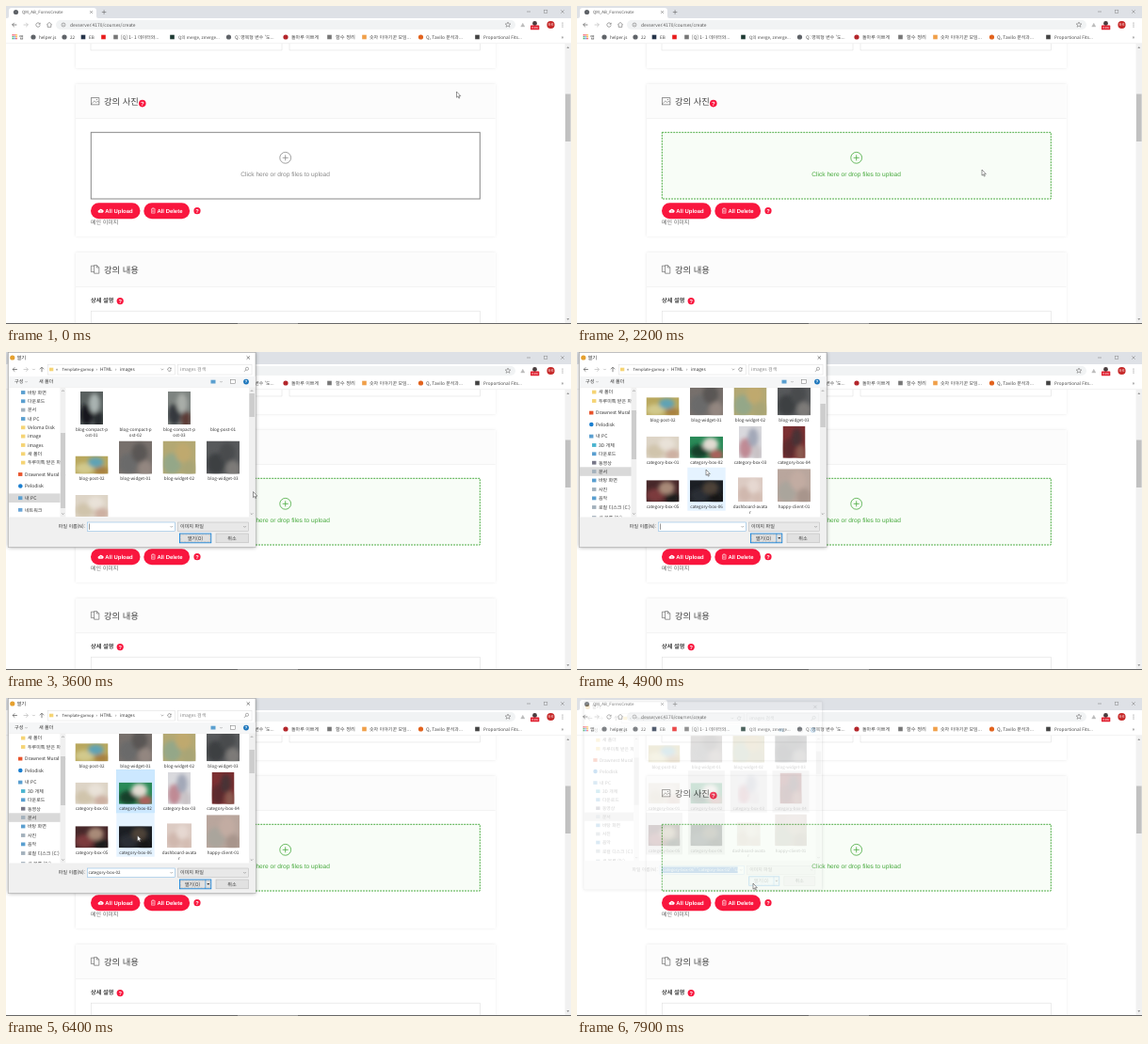
These frames come from a looping animation (600 by 338 pixels, 8 s). An HTML page:

```html
<!DOCTYPE html>
<html lang="ko">
<head>
<meta charset="utf-8">
<style>
html, body { margin: 0; width: 100%; height: 100%; overflow: hidden; background: #fff; }
svg { display: block; }
#stage { width: 600px; height: 338px; }
text { font-family: 'Noto Sans CJK KR', 'Noto Sans', sans-serif; text-rendering: geometricPrecision; white-space: pre; }
.web { font-family: 'Liberation Sans', Arial, sans-serif; }
.b { font-weight: 700; }
</style>
</head>
<body>
<svg id="stage" viewBox="0 0 600 338" xmlns="http://www.w3.org/2000/svg"></svg>
<script>
const LOOP = 8000, STEP = 100;
const RED = '#f9163e', GREEN = '#46a93c';

// Drawing helpers; text is centred vertically on y.
const rect = (x, y, w, h, fill, more = '') => `<rect x="${x}" y="${y}" width="${w}" height="${h}" fill="${fill}" ${more}/>`;
const box = (x, y, w, h, fill, line, sw = .6, more = '') => rect(x, y, w, h, fill, `stroke="${line}" stroke-width="${sw}" ${more}`);
const dot = (x, y, r, fill) => `<circle cx="${x}" cy="${y}" r="${r}" fill="${fill}"/>`;
const path = (d, line = '#666', sw = .6, fill = 'none') => `<path d="${d}" stroke="${line}" stroke-width="${sw}" fill="${fill}"/>`;
const text = (x, y, s, size = 5, fill = '#333', more = '') =>
  `<text x="${x}" y="${y + size * .36}" font-size="${size}" fill="${fill}" ${more}>${s}</text>`;
const mid = 'text-anchor="middle"';
const group = (id, s, more = '') => `<g id="${id}" ${more}>${s}</g>`;
const down = (x, y, s = 1.6, c = '#666') => path(`M${x - s} ${y - s / 2}l${s} ${s}l${s} ${-s}`, c, .5);
const cross = (x, y, s, c) => path(`M${x - s} ${y - s}l${2 * s} ${2 * s}m0 ${-2 * s}l${-2 * s} ${2 * s}`, c, .6);
const arrow = (x, y, dir, c) => path(`M${x - 2.4 * dir} ${y}h${4.8 * dir}m${-2.2 * dir} -2.2l${2.2 * dir} 2.2l${-2.2 * dir} 2.2`, c, .7);
const reload = (x, y, r = 2.2) => path(`M${x + r * .8} ${y - r * .6}a${r} ${r} 0 1 0 ${r * .2} ${r * .8}M${x + r} ${y - r}v${r * .7}h${-r * .7}`);
const help = (x, y, r, c = RED) => dot(x, y, r, c) + text(x, y, '?', r * 1.6, '#fff', `class="web b" ${mid}`);

function browser() {
  let s = rect(0, 0, 600, 13, '#dee1e6') + path('M1 13q2 0 2-2V5q0-3 3-3H93q3 0 3 3v6q0 2 2 2z', 'none', 0, '#fff');
  s += dot(10.5, 6.5, 2.6, '#5f6368') + text(17, 6.3, 'QM_AB_FormsCreate', 4.4, '#555');
  s += cross(90.5, 6.5, 1.3, '#666') + path('M101.8 6.5h4.6M104.1 4.2v4.6');
  s += path('M553 6h4', '#888') + box(571.3, 4.2, 3.5, 3.5, 'none', '#888', .5) + cross(591, 6, 1.7, '#888');
  s += rect(0, 13, 600, 27, '#fff') + rect(53, 15, 488, 10, '#f1f3f4', 'rx="5"');
  s += arrow(9, 20, -1, '#555') + arrow(21, 20, 1, '#bbb') + reload(34, 20);
  s += path('M43.2 20l2.8-2.6l2.8 2.6M44.2 19.5v2.9h3.6v-2.9') + `<circle cx="61" cy="20" r="2" fill="none" stroke="#666" stroke-width=".5"/>` + path('M61 19.7v1.4M61 18.6v.5', '#666', .5);
  s += text(68, 20, 'devserver:4170/courses/create', 4.85, '#555');
  s += path('M533 17l.9 2h2l-1.6 1.3l.6 2l-1.9-1.2l-1.9 1.2l.6-2l-1.6-1.3h2z', '#666', .5);
  s += path('M546.7 22l2.1-3.8l2.1 3.8z', '#bbb', .4, '#bbb') + dot(561.5, 18.5, 2.4, '#4a3c3e') + rect(557, 20.5, 9.3, 4.8, '#e02030', 'rx=".6"');
  s += text(561.7, 22.8, 'new', 3.4, '#fff', mid) + dot(578.5, 20, 4.1, '#c62828') + text(578.5, 20, '하루', 3.4, '#fff', mid);
  s += [18, 20, 22].map(y => dot(591, y, .5, '#666')).join('');

  const apps = ['#e34', '#e34', '#f90', '#3a5', '#48e', '#f90', '#3a5', '#48e', '#e34'];
  apps.forEach((c, i) => s += rect(6.6 + i % 3 * 1.9, 30.2 + (i / 3 | 0) * 1.9, 1.3, 1.3, c));
  // [icon x, colour, round, label x, label, size]
  const marks = [
    [29, '#5f6368', 1, 35, 'helper.js', 4.6], [62, '#5f6368', 1, 68, '22', 4.6],
    [82, '#26344a', 0, 88, 'EB', 4.6], [103.5, '#e81c1c', 0, 0, '', 5],
    [116.5, '#777', 0, 122, '[Q] 1- 1 데이터와...', 4.9], [176.5, '#1f3b33', 0, 183, 'Q의 merge, zmerge...', 4.5],
    [236.5, '#5f6368', 1, 243, "Q: 명목형 변수 '도...", 4.9], [297, '#b3262b', 1, 303, '돌마루 이쁘게', 5],
    [343.5, '#777', 0, 350, '함수 정리', 5.3], [380.5, '#f0a04a', 0, 386, '숫자 이야기꾼 모임...', 5],
    [440.5, '#e2631e', 1, 446, 'Q, Tavilo 분석과...', 4.9], [500.5, '#444', 0, 507, 'Proportional Fits...', 4.7]
  ];
  marks.forEach(([x, c, round, tx, label, size]) =>
    s += (round ? dot(x, 33, 2.6, c) : rect(x - 2.3, 30.7, 4.6, 4.6, c)) + text(tx, 33, label, size, '#444'));
  return s + text(14, 33, '앱', 5, '#444') + text(589.5, 32.6, '»', 5.5, '#555') + rect(0, 39.6, 600, .5, '#e4e4e4');
}

function page() {
  const card = (y, h, head) => rect(74, y, 445.5, h, '#fff', 'filter="url(#soft)"') + rect(74, y, 445.5, h, '#fff') +
    (head ? rect(74, y, 445.5, head, '#fcfcfc') + rect(74, y + head, 445.5, .7, '#eee') : '');
  const line = '#e0e0e0';
  let s = rect(0, 40, 600, 298, '#fff') + card(20, 46, 0) + card(83, 161.5, 36) + card(262, 90, 36);
  s += box(90, 30, 203, 17, '#fff', line) + box(301, 30, 202.5, 17, '#fff', line);
  s += box(90.3, 97.7, 8.6, 7.2, 'none', '#555') + path('M91 103.8l2.8-3l2 1.8l1.6-1.6l1.4 1.6', '#555', .5) + dot(96.5, 99.6, .5, '#555');
  s += text(104, 101.4, '강의 사진', 9.3, '#444') + help(144.8, 103.6, 3.8);
  s += box(90.3, 134.3, 413, 70.7, '#fff', '#888', 1, 'id="zone"');
  s += group('prompt', `<circle cx="296.7" cy="161.3" r="5.9"/><path d="M293.7 161.3h6M296.7 158.3v6"/>`, 'fill="none" stroke-width=".8"');
  s += text(296.6, 178.7, 'Click here or drop files to upload', 6.6, '#888', `id="hint" class="web" ${mid}`);
  s += rect(90, 209.3, 52.5, 17, RED, 'rx="8.5"') + rect(146.3, 209.3, 48.8, 17, RED, 'rx="8.5"');
  s += path('M99 219.8a1.4 1.4 0 0 1 0-2.8a1.8 1.8 0 0 1 3.2-.5a1.7 1.7 0 0 1 .3 3.3z', 'none', 0, '#fff') + path('M100.8 219.2v-1.7m-.8.7l.8-.8l.8.8', RED, .4);
  s += text(105.3, 217.8, 'All Upload', 5.95, '#fff', 'class="web b"');
  s += path('M154 215.8h4.6M155.4 215.6v-.8h1.8v.8M154.5 216v4.2h3.6v-4.2M155.7 217v2.4M157 217v2.4', '#fff', .5);
  s += text(160.4, 217.8, 'All Delete', 5.95, '#fff', 'class="web b"') + help(203, 217.7, 3.6);
  s += text(90, 229.6, '메인 이미지', 6, '#666');
  s += path('M93.6 282.6h-3.2v-6.4h3.4M93.6 284.2v-8.6h3l2.2 2.2v6.4zM96.4 275.8v2.2h2.2', '#555');
  s += text(104, 280.2, '강의 내용', 9.3, '#444') + text(90, 313.2, '상세 설명', 6.2, '#444', 'class="b"') + help(121.2, 313.6, 3.6);
  s += box(90.3, 324.2, 413, 30, '#fff', line);
  s += rect(593.5, 40, 6.5, 297, '#f1f1f1') + rect(594, 93.5, 5.6, 50.5, '#c1c1c1');
  s += path('M595.4 44.8l1.4-1.6l1.4 1.6z', 'none', 0, '#777') + path('M595.4 332.2l1.4 1.6l1.4-1.6z', 'none', 0, '#777');
  return s + rect(0, 337, 600, 1, '#666') + rect(246, 337, 64, 1, '#999');
}

// Files: [label, thumb width, thumb height, late-loading, base colour, three patches]
const COLS = [91, 137.5, 184, 230.5];
const TOPS = [38.5, 92, 138.5, 185], BASES = [77, 129.5, 175, 221.5], LABELS = [82.3, 134.5, 180, 226.5];
const FILES = [
  ['blog-compact-p|ost-01', 24, 35, 0, '#59605f', '#14191e', '#a9b3b1', '#272b2e'],
  ['blog-compact-p|ost-02', 24, 35, 1, '#8d8a84', '#4a4f52', '#c9c4bb', '#5f5850'],
  ['blog-compact-p|ost-03', 24, 35, 0, '#7d8380', '#34393c', '#a9ada8', '#5b3a35'],
  ['blog-post-01', 35, 23, 1, '#a8a49b', '#6a7074', '#d3cec4', '#7b6a5a'],
  ['blog-post-02', 35, 19, 0, '#b9a85e', '#d2c98c', '#5fa3b5', '#a8813f'],
  ['blog-widget-01', 35, 35, 0, '#77706c', '#6a6b6b', '#5a5654', '#938680'],
  ['blog-widget-02', 35, 35, 0, '#b3a873', '#94a788', '#bfa96e', '#a9a576'],
  ['blog-widget-03', 35, 35, 0, '#57595b', '#3c4043', '#4a4c4e', '#7d7a78'],
  ['category-box-01', 35, 23, 0, '#ddd4c6', '#d0c4ac', '#e9e2d8', '#cdb0a2'],
  ['category-box-02', 35, 23, 1, '#2a8a58', '#16402c', '#e2dcd2', '#a8615a'],
  ['category-box-03', 24, 34, 1, '#d9d9dd', '#c08a94', '#a3a8b8', '#c9c3c6'],
  ['category-box-04', 24, 34, 1, '#7c3032', '#5b2a2e', '#4a3034', '#8a5a50'],
  ['category-box-05', 35, 23, 1, '#47282a', '#7c3a3c', '#a88a78', '#1d1b1d'],
  ['category-box-06', 35, 23, 1, '#1c1f24', '#2a2d34', '#4d4238', '#131518'],
  ['dashboard-avata|r', 26, 26, 1, '#dccbc3', '#d0b8ae', '#e6d8d1', '#d4bdb3'],
  ['happy-client-01', 35, 35, 1, '#b9a69d', '#aaa59c', '#c2aca2', '#a8958c']
];
const cellBox = i => [COLS[i % 4] - 20.2, TOPS[i >> 2], 40.4, 46];

function fileCell([label, w, h, late, base, ...patches], i) {
  const x = COLS[i % 4], row = i >> 2;
  const spots = [[.28, .7, .28, .32], [.62, .36, .24, .3], [.8, .85, .22, .26]];
  const photo = rect(0, 0, w, h, base) + `<g filter="url(#blur)">` + patches.map((c, k) => {
    const [a, b, rx, ry] = spots[k];
    return `<ellipse cx="${a * w}" cy="${b * h}" rx="${rx * w}" ry="${ry * h}" fill="${c}"/>`;
  }).join('') + '</g>';
  return box(...cellBox(i), 'none', 'none', .5, 'class="cell"') +
    `<svg x="${x - w / 2}" y="${BASES[row] - h}" width="${w}" height="${h}" overflow="hidden" ${late ? 'class="late"' : ''}>${photo}</svg>` +
    label.split('|').map((s, n) => text(x, LABELS[row] + n * 6, s, 4.6, '#333', mid)).join('');
}

// Rows: [y, label, icon colour, top level]
const navRows = rows => rows.map(([y, s, c, top]) => {
  const x = top ? 13 : 16;
  return (top === 2 ? dot(x + 2.3, y, 2.3, c) : rect(x, y - 1.9, 4.4, 3.8, c)) + text(top ? 20 : 23, y, s, 5);
}).join('');
const YELLOW = '#f5d475', BLUE = '#5a9fd0', GRAY = '#a3b1bc';
const NAV_A = [[43, '바탕 화면', BLUE], [52.3, '다운로드', BLUE], [61.6, '문서', GRAY], [71, '내 PC', BLUE],
  [80.3, 'Veloma Disk', YELLOW], [89.6, 'image', YELLOW], [99, 'images', YELLOW], [108.3, '새 폴더', YELLOW], [117.6, '두루미톡 받은 파', YELLOW],
  [130, 'Drawnest Mural Files', '#e8542c', 1], [142.5, 'Pelodisk', '#1b7fd0', 2], [155.2, '내 PC', BLUE, 1], [167.8, '네트워크', '#6aa5d8', 1]];
const NAV_B = [[42.6, '새 폴더', YELLOW], [52, '두루미톡 받은 파', YELLOW], [64.6, 'Drawnest Mural Files', '#e8542c', 1],
  [77, 'Pelodisk', '#1b7fd0', 2], [89.6, '내 PC', BLUE, 1], [99, '3D 개체', '#4ab4d0'], [108.3, '다운로드', BLUE], [117.7, '동영상', '#778'],
  [127, '문서', GRAY], [136.5, '바탕 화면', BLUE], [146, '사진', GRAY], [155.4, '음악', BLUE], [165, '로컬 디스크 (C:)', GRAY], [176, '새 볼륨 (D:)', GRAY]];

function dialog() {
  const edge = '#dcdcdc';
  let s = rect(2.5, 0, 262.5, 207.5, '#000', 'filter="url(#shade)" opacity=".4"') + box(2.5, .3, 262.5, 207, '#fff', '#999', .5);
  s += dot(6.8, 6, 2.6, '#e5a02e') + text(11.5, 6, '열기', 5.3) + cross(257.3, 6, 1.7, '#444');
  s += arrow(9.5, 18.5, -1, '#555') + arrow(21, 18.5, 1, '#bbb') + down(29.5, 18.5, 1.2, '#888') + path('M38 21.2v-5m-2.1 2.1l2.1-2.1l2.1 2.1', '#555', .7);
  s += box(44.3, 13.5, 135, 10.5, '#fff', edge, .5) + rect(46, 16.7, 4.3, 3.6, YELLOW) + text(53, 18.2, '«', 4.6);
  [[59.5, 'Template-garnop', 4.2], [95.5, '›', 4.7], [100, 'HTML', 4.7], [116, '›', 4.7], [121, 'images', 4.7]].forEach(([x, l, size]) => s += text(x, 18.5, l, size));
  s += down(166, 18.5, 1.4) + reload(173.5, 18.5, 1.8) + box(182.3, 13.5, 78.7, 10.5, '#fff', edge, .5) + text(185, 18.5, 'images 검색', 5, '#888');
  s += `<circle cx="256" cy="17.8" r="1.6" fill="none" stroke="#666" stroke-width=".5"/>` + path('M254.8 19l-1.8 1.8');
  s += rect(3, 26, 261.7, 11.6, '#f5f6f7') + rect(3, 37.6, 261.7, .5, '#e8e8e8');
  s += text(9, 31.5, '구성', 5.1) + down(21.5, 31.7, 1) + text(35, 31.5, '새 폴더', 5.1);
  s += rect(217.5, 29.7, 5, 3.8, BLUE) + down(228.5, 31.7, 1) + box(238.7, 29.7, 4.6, 3.8, '#fff', '#777', .5) + help(255, 31.6, 2.9, '#1b75bb');

  s += `<svg x="3" y="38" width="261.5" height="137.5" viewBox="3 38 261.5 137.5" overflow="hidden">`;
  s += group('navA', rect(3, 150.4, 55, 9.6, '#d9d9d9') + navRows(NAV_A));
  s += group('navB', rect(3, 122.3, 55, 9.5, '#d9d9d9') + navRows(NAV_B));
  s += rect(57.5, 38, 6, 138, '#f0f0f0') + rect(58, 44, 5, 55, '#cdcdcd', 'id="navBar"') + down(60.5, 172, 1.3) + path('M59.2 42l1.3-1.3l1.3 1.3', '#666', .5);
  s += rect(63.5, 38, 200, 138, '#fff') + group('list', FILES.map(fileCell).join(''));
  s += rect(258, 38, 6.3, 138, '#f0f0f0') + rect(258.4, 44, 5.5, 25, '#cdcdcd', 'id="listBar"') + down(261, 172, 1.3) + path('M259.7 42l1.3-1.3l1.3 1.3', '#666', .5) + '</svg>';

  s += rect(2.9, 175.5, 261.8, 31.6, '#f0f0f0') + text(84, 185.5, '파일 이름(N):', 5, '#333', 'text-anchor="end"');
  s += box(86.3, 181, 93, 9.3, '#fff', '#7ab3e2', .5) + down(175.7, 185.7, 1.2);
  s += `<svg x="87" y="181" width="85.5" height="9.3" viewBox="87 181 85.5 9.3" overflow="hidden">` +
    rect(88, 182.3, 84, 6.8, '#3a7bd0', 'id="mark"') + text(87.5, 185.5, '', 4.5, '#333', 'id="fileName"') + rect(88, 182.5, .5, 6.3, '#333', 'id="caret"') + '</svg>';
  s += box(182.3, 181, 75, 9.3, '#e8e8e8', '#b8b8b8', .5) + text(185, 185.5, '이미지 파일', 5.1) + down(253.5, 185.7, 1.2);
  s += box(184.5, 193, 33.3, 9.8, '#e1e1e1', '#0078d7', .8, 'id="open"') + box(185.6, 194.1, 31.1, 7.6, 'none', '#666', .3, 'stroke-dasharray=".7 .7"');
  s += text(201, 197.8, '열기(O)', 5.1, '#333', `id="openText" ${mid}`);
  s += group('split', path('M211.8 193v9.8', '#0078d7', .5) + path('M213.2 197l1.6 1.8l1.6-1.8z', 'none', 0, '#333'));
  return s + box(223, 193, 34.3, 9.8, '#e1e1e1', '#b4b4b4', .5) + text(240, 197.8, '취소', 5.1, '#333', mid);
}

const stage = document.getElementById('stage');
stage.innerHTML = `<defs>
  <filter id="soft" x="-10%" y="-20%" width="120%" height="140%"><feDropShadow dx="0" dy="0" stdDeviation="1.6" flood-opacity=".1"/></filter>
  <filter id="blur" x="-30%" y="-30%" width="160%" height="160%"><feGaussianBlur stdDeviation="2"/></filter>
  <filter id="shade"><feGaussianBlur stdDeviation="2"/></filter></defs>` +
  page() + browser() + group('dialog', dialog()) +
  group('cursor', path('M0 0v6.2l1.4-1.3l1 2.2l.9-.4l-.9-2.1h1.9z', '#333', .5, '#fff'));

const $ = id => document.getElementById(id);
const set = (el, attrs) => { for (const k in attrs) el.setAttribute(k, attrs[k]); };
const show = (el, on) => el.style.display = on ? '' : 'none';
const cells = [...stage.querySelectorAll('.cell')], late = [...stage.querySelectorAll('.late')];
const clamp = v => Math.min(1, Math.max(0, v));

// Pointer stops: [ms, x, y]
const STOPS = [[0, 478.5, 91], [100, 478.5, 91], [1400, 430, 174], [3200, 430, 174], [3600, 262.5, 148.5], [4200, 137, 125],
  [5600, 137, 125], [5900, 137, 105], [6100, 137, 105], [6400, 139.5, 146], [6700, 139.5, 146], [7300, 186.5, 195], [7600, 187, 197], [LOOP, 187, 197]];

function pointer(t) {
  const i = Math.max(1, STOPS.findIndex(s => s[0] > t));
  const [t0, x0, y0] = STOPS[i - 1], [t1, x1, y1] = STOPS[i];
  const p = clamp((t - t0) / (t1 - t0)), e = p * p * (3 - 2 * p);
  return [x0 + (x1 - x0) * e, y0 + (y1 - y0) * e];
}

function draw(t) {
  const [x, y] = pointer(t);
  set($('cursor'), { transform: `translate(${x} ${y})` });

  const hot = t >= 800, tone = hot ? GREEN : '#888';
  set($('zone'), { stroke: tone, fill: hot ? '#f8fdf7' : '#fff', 'stroke-dasharray': hot ? '1.9 1.1' : 'none' });
  set($('prompt'), { stroke: tone });
  set($('hint'), { fill: tone });

  const closing = clamp((t - 7750) / 190), opening = clamp((t - 2500) / 200);
  const alpha = opening * (1 - closing), k = 1 - .045 * (1 - opening + closing);
  show($('dialog'), alpha > 0);
  set($('dialog'), { opacity: alpha, transform: `translate(133.7 103.5) scale(${k}) translate(-133.7 -103.5)` });

  const expanded = t >= 4400, scroll = t >= 4900 ? 62.3 : 0;
  show($('navA'), !expanded);
  show($('navB'), expanded);
  set($('navBar'), { y: expanded ? 62 : 86, height: expanded ? 52 : 80 });
  show($('list'), t >= 3000);
  set($('list'), { transform: `translate(0 ${-scroll})` });
  set($('listBar'), { y: scroll ? 55 : 44 });
  late.forEach(el => show(el, expanded));
  show($('split'), expanded);
  set($('openText'), { x: expanded ? 198 : 201 });

  const last = t >= 6600 ? 13 : t >= 6000 ? 9 : 0, done = t >= 7600;
  cells.forEach((el, i) => {
    const [cx, cy, w, h] = cellBox(i);
    const over = y < 175 && x > cx && x < cx + w && y + scroll > cy && y + scroll < cy + h;
    const picked = i >= 9 && i <= last;
    set(el, {
      fill: picked ? (done ? '#d9d9d9' : '#cce8ff') : over ? '#e5f3ff' : 'none',
      stroke: picked && !done ? '#b8dffc' : 'none'
    });
  });
  $('fileName').textContent = last === 13 ? '"category-box-06" "category-box-02" "category-box-03"' : last ? 'category-box-02' : '';
  set($('fileName'), { fill: done ? '#fff' : '#333' });
  show($('mark'), done);
  show($('caret'), !last);
  set($('open'), { fill: y > 193 ? '#e5f1fb' : '#e1e1e1' });
}

function tick() {
  draw(Math.floor(performance.now() % LOOP / STEP) * STEP);
  requestAnimationFrame(tick);
}
tick();
</script>
</body>
</html>
```
